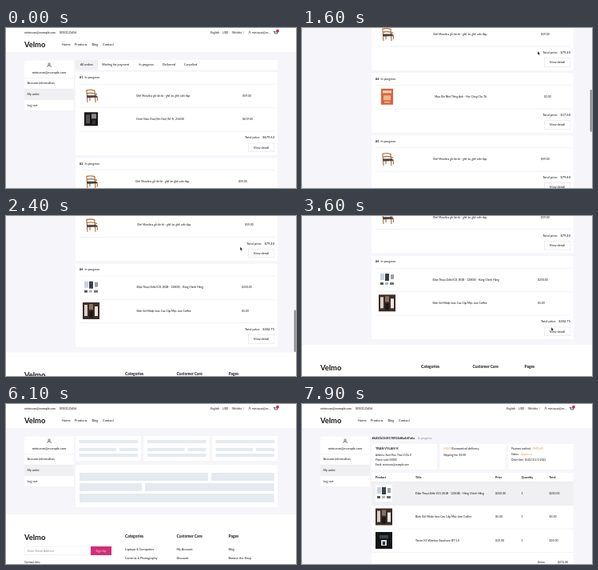
Recreate the animation shown at these times as an HTML page. Size 363 by 200 pixels, loop 8000 ms.

```html
<!DOCTYPE html>
<html lang="en">
<head>
<meta charset="utf-8">
<title>My orders</title>
<style>
html, body { margin: 0; width: 100%; height: 100%; overflow: hidden; background: #fff; }
svg { display: block; width: 363px; height: 200px; }
text { font-family: Lato, sans-serif; fill: #16161c; white-space: pre; }
</style>
</head>
<body>
<svg id="stage" viewBox="0 0 363 200"></svg>
<script>
const LOOP = 8000, STEP = 100;
const LIST_END = 615, SKELETON_END = 138, LIST_HEIGHT = 757, SCROLL_END = 454;
const BRAND = 'Velmo', EMAIL = 'mintuvan@example.com';

// y is the vertical centre of the text
const text = (x, y, str, size = 3.8, attrs = '') =>
  `<text x="${x}" y="${y + size * 0.35}" font-size="${size}" ${attrs}>${str}</text>`;
const rect = (x, y, w, h, fill = '#fff', attrs = '') =>
  `<rect x="${x}" y="${y}" width="${w}" height="${h}" fill="${fill}" ${attrs}/>`;
const path = (d, stroke, width = 0.6, fill = 'none') =>
  `<path d="${d}" stroke="${stroke}" stroke-width="${width}" fill="${fill}"/>`;
const at = (x, y, content) => `<g transform="translate(${x} ${y})">${content}</g>`;
const rule = (x, y, w) => rect(x, y, w, 0.5, '#e6e6ea');
const bold = 'font-weight="700"', middle = 'text-anchor="middle"', right = 'text-anchor="end"';
const grey = 'style="fill:#8a8a92"', orange = 'style="fill:#e2a25a"';

const person = (x, y, s) => at(x, y, `<g transform="scale(${s})">` +
  path('M-1.2-1.3a1.2 1.2 0 1 0 2.4 0a1.2 1.2 0 1 0-2.4 0M-2.2 2.4V1.6Q-2.2.6-1.2.6H1.2Q2.2.6 2.2 1.6V2.4', '#222', 0.6) + '</g>');

// Product pictures on a 21 x 21 tile
const pictures = {
  chair: rect(0, 0, 21, 21) +
    path('M5 4L6 19M15 4.5L16 19M9 11V17M18 11L18.5 17', '#a8683c', 1.1) +
    path('M4.5 4Q10 2.5 15.5 4.5M5 8Q12 6 18 9', '#b87a4a', 1.4) +
    path('M5.5 10.5L17 10.5L18 12.5L6 13Z', '#3a3333', 0.5, '#4a4040'),
  tablet: rect(0, 0, 21, 21) + rect(2, 2, 17, 17, '#17171a') + rect(4, 5, 5, 11, '#55504c') +
    rect(11, 4, 6, 6, '#8f8a85') + rect(12, 12, 4, 5, '#34343a'),
  book: rect(0, 0, 21, 21) + rect(3, 0.5, 15, 20, '#d9653b') + rect(5, 3, 11, 3, '#f4d8c4') +
    rect(6, 9, 9, 6, '#f0b48c') + rect(7, 17, 7, 1, '#f4d8c4'),
  phone: rect(0, 0, 21, 21) + rect(2, 3, 5, 8, '#c9d2dc') + rect(8, 3, 5, 9, '#3c4048') +
    rect(15, 4, 4, 6, '#9aa0a8') + rect(2, 14, 4, 3, '#55585e') + rect(8, 14, 4, 3, '#b4b7bb') + rect(14, 14, 5, 3, '#707378'),
  flask: rect(0, 0, 21, 21, '#3b2e29') + rect(2, 3, 4, 14, '#d9d0c8') + rect(8, 2, 5, 7, '#8b6f5e') +
    rect(8, 11, 5, 8, '#1d1918') + rect(15, 5, 4, 12, '#eee6df'),
  earbuds: rect(0, 0, 21, 21, '#141519') + rect(5, 4, 11, 4, '#3d4047') + rect(7, 10, 7, 7, '#d6d8dc') + rect(9, 12, 3, 4, '#30333a')
};

const goods = {
  chair: ['Ghế Marulina gỗ tần bì - ghế ăn, ghế cafe đẹp', '$59.00'],
  tablet: ['Orvel Slate Duo (5th Gen) Wi-Fi, 256GB', '$619.00'],
  book: ['Mẹo Ghi Nhớ Tiếng Anh - Học Cùng Câu Từ', '$2.00'],
  phone: ['Điện Thoại Zelbi K31 (8GB - 128GB) - Hàng Chính Hãng', '$250.00'],
  flask: ['Bình Giữ Nhiệt Inox Cao Cấp Mộc Lam Coffee', '$5.00'],
  earbuds: ['Tarvio K5 Wireless Earphone BT 5.0', '$19.00']
};

// Items, title x, price x, total
const orders = [
  [['chair', 'tablet'], 163, 296, '$679.63'],
  [['chair', 'flask'], 162, 291, '$69.40'],
  [['chair'], 164, 299, '$79.40'],
  [['book'], 166, 303, '$17.60'],
  [['chair'], 164, 299, '$79.40'],
  [['phone', 'flask'], 163.5, 295, '$304.75']
];

const header = rect(0, 0, 363, 30) +
  text(23, 5.5, EMAIL, 3.7) + text(67, 5.5, '0000123456', 3.7) +
  text(256, 5.5, 'English', 3.6) + text(271, 5.5, 'USD', 3.6) + text(283, 5.5, 'Wishlist ♡', 3.4) +
  person(305, 5.5, 0.6) + text(308, 5.5, 'mintuvan@ex...', 3.4) +
  path('M334.5 4H335.5L336.5 7H339.5L340.3 4.8H336', '#222', 0.7) +
  '<circle cx="340" cy="3.6" r="1.9" fill="#c0305f"/>' +
  text(23, 20.5, BRAND, 9.4, bold) +
  [[70, 'Home'], [86, 'Products'], [107.5, 'Blog'], [121, 'Contact']].map(([x, s]) => text(x, 20.7, s, 4)).join('');

const sidebar = rect(23, 40.5, 62, 62.5) + person(54, 46.5, 1) + text(54, 55.2, EMAIL, 4, middle) +
  rect(23, 76, 62, 13.5, '#f0f0f2') +
  ['Account information', 'My order', 'Log out'].map((s, i) =>
    rule(23, 62 + 13.8 * i, 62) + text(26.5, 68.8 + 13.8 * i, s)).join('');

const footer = top => at(0, top, rect(0, 0, 363, 142) +
  text(23, 28.3, BRAND, 9.4, bold) +
  rect(23, 40, 83, 10.5, '#fff', 'stroke="#e8e8ec" stroke-width=".5"') + text(27, 45.3, 'Enter Email Address', 3.8, grey) +
  rect(106, 40, 26, 11, '#cf2f79') + text(119, 45.5, 'Sign Up', 3.8, middle + ' style="fill:#fbd5e6"') +
  text(23, 60, 'Contact Info', 3.6) +
  [[149, 'Categories', 'Laptops &amp; Computers', 'Cameras &amp; Photography'],
   [213.5, 'Customer Care', 'My Account', 'Discount'],
   [278.5, 'Pages', 'Blog', 'Browse the Shop']].map(([x, head, a, b]) =>
    text(x, 27, head, 4.9, bold) + text(x, 44, a) + text(x, 55, b)).join(''));

const tabs = rect(87, 40, 253, 12.5) + rect(87, 40, 28, 12.5, '#f0f0f2') +
  [[93, 'All orders'], [120, 'Waiting for payment'], [166.5, 'In progress'], [196, 'Delivered'], [223, 'Cancelled']]
    .map(([x, s]) => text(x, 46, s)).join('');

function orderCard([items, titleX, priceX, total], index) {
  const end = 15 + 29.5 * items.length;
  return rect(87, 0, 253, end + 30) +
    text(92, 7, '#' + (index + 1), 3.8, bold) + text(98.5, 7, 'In progress', 3.9) + rule(92, 15, 244) +
    items.map((name, i) => {
      const y = 29.5 + 29.3 * i, [title, price] = goods[name];
      return at(96, y - 10.5, pictures[name]) + text(titleX, y, title, 3.4) + text(priceX, y, price, 3.4) +
        rule(92, y + 15, 244);
    }).join('') +
    text(336, end + 8, 'Total price:   ' + total, 4, right) +
    rect(303.3, end + 15, 32.5, 10.5, '#fff', 'stroke="#dcdce0" stroke-width=".5"') +
    text(319.5, end + 20.3, 'View detail', 4, middle);
}

function listPage() {
  let y = 55;
  const cards = orders.map((order, i) => {
    const card = at(0, y, orderCard(order, i));
    y += 48.5 + 29.5 * order[0].length;
    return card;
  });
  return tabs + cards.join('') + footer(LIST_END);
}

function skeletonPage() {
  const bar = (x1, x2, y, h) => rect(x1, y, x2 - x1, h, '#e5eaf0', 'rx=".6"');
  const cards = [87, 172.5, 258], bars = cards.map(x =>
    bar(x + 4.5, x + 78, 45, 4) + bar(x + 4.5, x + 51, 55, 4) + bar(x + 55, x + 78, 55, 4) + bar(x + 4.5, x + 78, 62, 4));
  return cards.map(x => rect(x, 40, 82, 31)).join('') + rect(87, 76, 253, 53) +
    `<g id="bars">${bars.join('')}` +
    bar(92, 253, 86, 10) + bar(257, 335.5, 86, 10) +
    bar(92, 170, 99, 10) + bar(174, 335.5, 99, 10) + bar(92, 335.5, 112, 11) + '</g>' + footer(SKELETON_END);
}

function detailPage() {
  const columns = [92, 142, 242, 274.5, 309.5];
  return text(87.5, 43, '#6450e1f4f178924d8a4d7a6a', 3.9, bold) + text(145, 43, 'In progress', 3.6, grey) +
    [87, 172.5, 258].map(x => rect(x, 50, 82, 32)).join('') +
    text(92, 56, 'TRAN VYLAM K', 3.9, bold) + text(92, 63.7, 'Address: Xom Mau, Thon Vi Du 8', 3.1) +
    text(92, 69.6, 'Phone code: 00000', 3.1) + text(92, 75.5, 'Email: ' + EMAIL, 3.1) +
    text(177, 56, 'GNVX', 3.7, orange) + text(187.5, 56, 'Economical delivery', 3.9) +
    text(177, 63.7, 'Shipping fee: $5.00', 3.3) +
    text(262, 56, 'Payment method:', 3.2) + text(288, 56, 'VIMOLAY', 3.2, orange) +
    text(262, 63, 'Status:', 3.2) + text(274, 63, 'Approved', 3.2, orange) +
    text(262, 69.8, 'Order time: 10:42:18 2/5/2023', 3.1) +
    rect(87, 86, 253, 120) + rect(87, 97, 253, 29.5, '#f0f0f2') +
    ['Product', 'Title', 'Price', 'Quantity', 'Total'].map((s, i) => text(columns[i], 91.7, s, 3.7, bold)).join('') +
    ['phone', 'flask', 'earbuds'].map((name, i) => {
      const y = 111.5 + 29.5 * i, [title, price] = goods[name];
      return rule(87, y - 14.7, 253) + at(92, y - 10.5, pictures[name]) +
        [title, price, '1', price].map((s, c) => text(columns[c + 1], y, s, 3.5)).join('');
    }).join('') + rule(87, 185, 253) +
    text(295, 197.5, 'Items:', 3.5) + text(333, 197.5, '$274.00', 3.5, right);
}

const stage = document.getElementById('stage');
const page = (id, bgHeight, content) =>
  `<g id="${id}">${rect(0, 30, 363, bgHeight, '#f5f5fa')}${header}${sidebar}${content}</g>`;
stage.innerHTML =
  page('list', LIST_END - 30, listPage()) +
  page('skeleton', SKELETON_END - 30, skeletonPage()) +
  page('detail', 170, detailPage()) +
  `<rect id="thumb" x="360.6" width="2.2" height="${200 * 200 / LIST_HEIGHT}" rx="1.1" fill="#8a8a8d"/>` +
  '<path id="cursor" d="M0 0V4.6L1.1 3.7L1.9 5.3L2.7 4.9L1.9 3.3H3.3Z" fill="#111" stroke="#fff" stroke-width=".4"/>';

const el = id => document.getElementById(id);
const show = (id, on) => el(id).setAttribute('visibility', on ? 'visible' : 'hidden');
const clamp = u => Math.min(1, Math.max(0, u));

// Time, x, y
const pointer = [[100, 338, 9], [500, 295, 29], [1600, 295, 29], [2400, 293, 38.5], [3100, 293, 38.5],
  [3600, 312, 139], [4000, 312, 139], [4900, 224.5, 117.5]];

function pointerAt(t) {
  const i = Math.max(1, pointer.findIndex(p => p[0] >= t));
  if (t >= 4900) return pointer[pointer.length - 1].slice(1);
  const [a, b] = [pointer[i - 1], pointer[i]], u = clamp((t - a[0]) / (b[0] - a[0])), e = u * u * (3 - 2 * u);
  return [a[1] + (b[1] - a[1]) * e, a[2] + (b[2] - a[2]) * e];
}

function draw(t) {
  const scroll = SCROLL_END * (1 - (1 - clamp((t - 800) / 1800)) ** 1.75);
  show('list', t < 3900);
  show('skeleton', t >= 3900 && t < 7900);
  show('detail', t >= 7900);
  show('thumb', t >= 900 && t < 3200);
  show('cursor', t >= 200 && t < 5000);
  el('list').setAttribute('transform', `translate(0 ${-scroll})`);
  el('thumb').setAttribute('y', scroll / LIST_HEIGHT * 200);
  el('cursor').setAttribute('transform', `translate(${pointerAt(t)})`);
  const phase = (Math.min(t, 6400) - 6100) / 1500;
  el('bars').setAttribute('opacity', 0.88 + 0.12 * Math.cos(2 * Math.PI * phase));
}

function tick() {
  const t = performance.now() % LOOP;
  draw(Math.floor(t / STEP) * STEP);
  requestAnimationFrame(tick);
}
tick();
</script>
</body>
</html>
```
